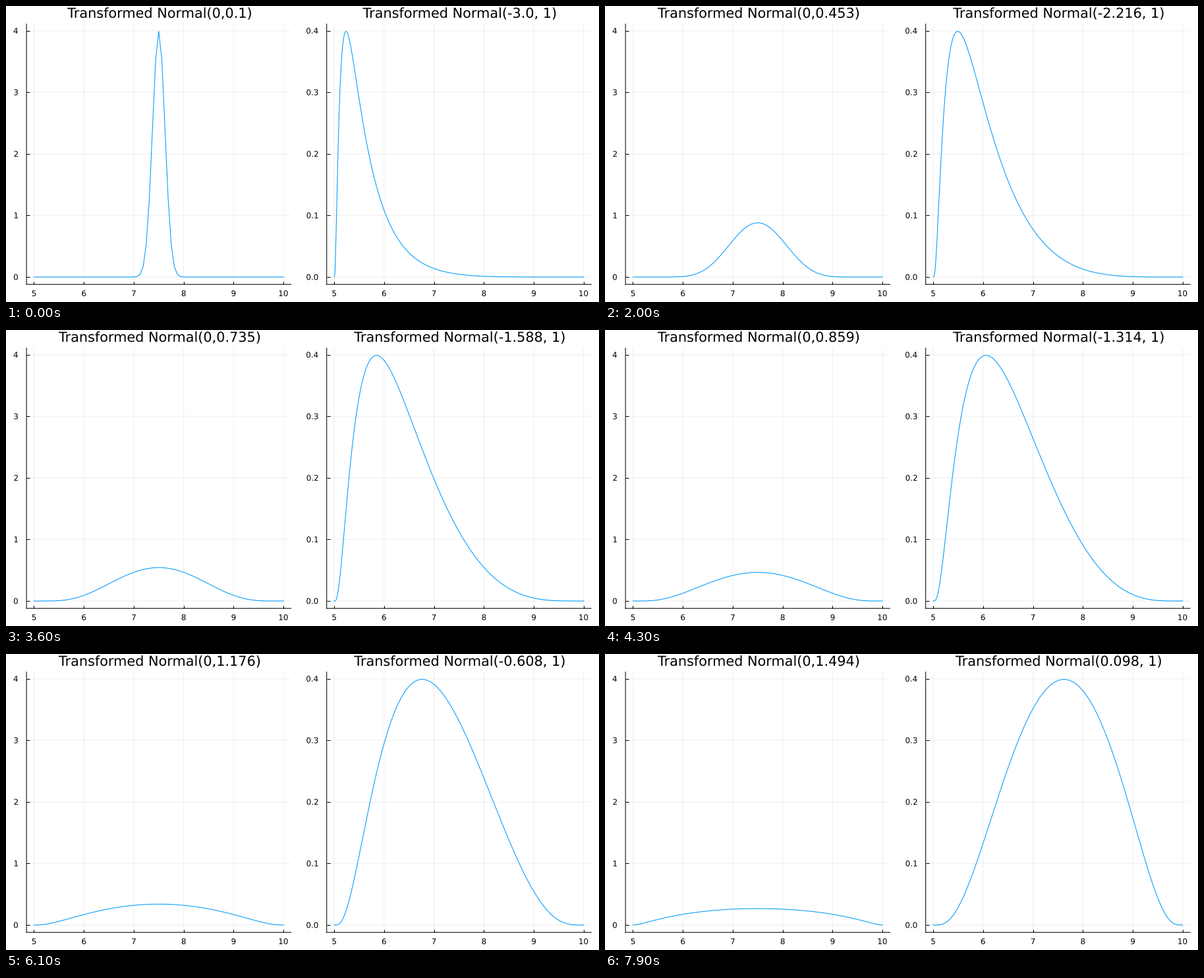
Animation of 900x450 px, one loop 8 s. Source, as a matplotlib script:

```python
import numpy as np
import matplotlib.pyplot as plt
from matplotlib.animation import FuncAnimation
from matplotlib.patches import PathPatch
from matplotlib.textpath import TextPath
from matplotlib.transforms import Affine2D, IdentityTransform

W, H, DPI = 900, 450, 100
PX = 72 / DPI  # points per pixel
FRAMES, STEPS = 80, 153
LO, HI = 5, 10
TOP, BOTTOM, WIDTH = 27.4, 423.2, 401.4
BLUE = "#009afa"

plt.rcParams.update({
    "font.family": "DejaVu Sans",
    "axes.linewidth": 1.05 * PX,
    "axes.axisbelow": True,
    "path.snap": False,
})

fig = plt.figure(figsize=(W / DPI, H / DPI), dpi=DPI, facecolor="white")


def density(x, mu, sigma):
    """Normal density over the logit of x rescaled from [LO, HI] to [0, 1]."""
    u = (x - LO) / (HI - LO)
    with np.errstate(divide="ignore"):
        z = (np.log(u) - np.log1p(-u) - mu) / sigma
    return np.exp(-z * z / 2) / (sigma * np.sqrt(2 * np.pi))


def text_path(x, baseline, text, size, anchor=0.5):
    """Outline of text; anchor 0.5 centres it on x, 1 ends it at x."""
    path = TextPath((0, 0), text, size=size)
    box = path.get_extents()
    shift = Affine2D().translate(x - box.x0 - anchor * box.width, H - baseline)
    return shift.transform_path(path)


def add_text(path):
    return fig.add_artist(PathPatch(path, facecolor="black", linewidth=0,
                                    transform=IdentityTransform()))


def make_panel(left, peak, ticks, fmt):
    ax = fig.add_axes([left / W, 1 - BOTTOM / H, WIDTH / W, (BOTTOM - TOP) / H])
    ax.set_xlim(LO - 0.15, HI + 0.15)
    ax.set_ylim(-0.03 * peak, 1.03 * peak)
    ax.set_xticks(range(LO, HI + 1))
    ax.set_yticks(ticks)
    ax.spines[["top", "right"]].set_visible(False)
    ax.tick_params(direction="in", length=4.5 * PX, width=1.05 * PX,
                   labelleft=False, labelbottom=False)
    ax.grid(color="black", alpha=0.065, linewidth=1 * PX)

    for t in range(LO, HI + 1):
        x = ax.transData.transform((t, 0))[0]
        add_text(text_path(x, 441.1, str(t), 11.9))
    for t in ticks:
        y = H - ax.transData.transform((LO, t))[1]
        add_text(text_path(left - 13.2, y + 4.35, fmt % t, 11.9, 1))

    line, = ax.plot([], [], color=BLUE, linewidth=1.05 * PX)
    return line


def title_path(x, text):
    return text_path(x, 17.9, text, 20.8)


x_coarse = np.linspace(LO, HI, 81)
x_fine = np.linspace(LO, HI, 801)
top_density = 1 / np.sqrt(2 * np.pi)

line_s = make_panel(31.1, 10 * top_density, np.arange(5), "%d")
line_m = make_panel(486.7, top_density, np.arange(5) / 10, "%.1f")
title_s = add_text(title_path(232.5, "Transformed"))
title_m = add_text(title_path(687.9, "Transformed"))


def update(i):
    sigma = 0.1 + 2.7 * i / STEPS
    mu = -3 + 6 * i / STEPS
    line_s.set_data(x_coarse, density(x_coarse, 0, sigma))
    line_m.set_data(x_fine, density(x_fine, mu, 1))
    title_s.set_path(title_path(232.5, f"Transformed Normal(0,{round(sigma, 3)})"))
    title_m.set_path(title_path(687.9, f"Transformed Normal({round(mu, 3)}, 1)"))
    return line_s, line_m, title_s, title_m


anim = FuncAnimation(fig, update, frames=FRAMES, interval=100,
                     repeat=True, repeat_delay=0)
plt.show()
```
